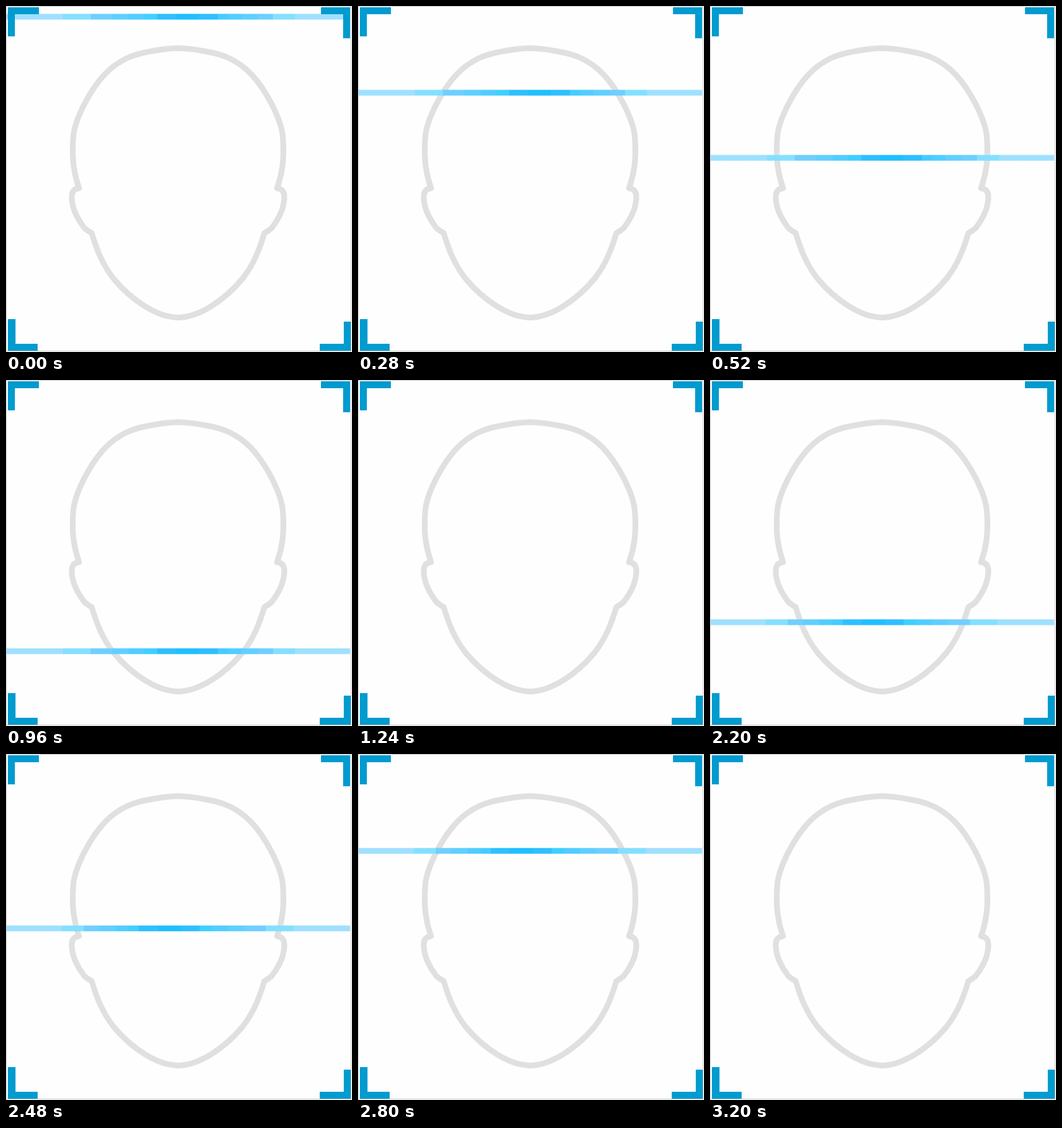
Write an HTML page that moves like this. It is 547x547 px and loops after 4200 ms.

```html
<!DOCTYPE html>
<html>
<head>
<meta charset="utf-8">
<title>Face scan</title>
<style>
  html, body { margin: 0; width: 100%; height: 100%; overflow: hidden; background: #fefefe; }
  svg { display: block; width: 100%; height: 100%; }
</style>
</head>
<body>
<svg viewBox="0 0 547 547">
  <defs><linearGradient id="glow" gradientUnits="userSpaceOnUse" x1="0" x2="545"></linearGradient></defs>
  <rect x=".5" y=".5" width="545" height="545" fill="none" stroke="#c8c8c8"/>
  <g fill="none" stroke="#e0e0e0" stroke-width="9" stroke-linejoin="round" stroke-linecap="round">
    <path id="half" d="M272 66.8C256 66.8 243 69 230 71.5C200 76 178 86 157 107
      C134 131 110 176 106.5 205C104 235 105.5 260 115.5 288C107 289 104 294 104 302
      C104 322 114 338 124 351C128 355 132 357 135.5 359C143 384 152 408 170 431
      C200 467 240 492 272 492.5"/>
    <use href="#half" transform="translate(544 0) scale(-1 1)"/>
  </g>
  <rect id="bar" x="1" width="543" height="9.1" fill="url(#glow)"/>
  <path fill="#009bcf" d="M3 2H52V13H14V48H3Z M498 2H544V51H533V13H498Z
    M3 495H15V534H50V545H3Z M534 499H545V545H496V534H534Z"/>
</svg>
<script>
  const LOOP = 4200, STEP = 40;
  const bar = document.getElementById('bar');
  const glow = document.getElementById('glow');

  // Flat bands: [right edge, colour]
  const bands = [
    [90, '#9fe0ff'], [134, '#85dfff'], [168, '#6fcfff'], [194, '#5fcfff'],
    [219, '#50cdff'], [239, '#3fcfff'], [268, '#2fbfff'], [305, '#1fbfff'],
    [335, '#2fbfff'], [351, '#45ccff'], [372, '#50cdff'], [398, '#60cfff'],
    [422, '#6fcfff'], [457, '#85dfff'], [545, '#9fe0ff']
  ];
  let left = 0;
  for (const [right, color] of bands) {
    for (const x of [left, right]) {
      const stop = document.createElementNS(glow.namespaceURI, 'stop');
      stop.setAttribute('offset', x / 545);
      stop.setAttribute('stop-color', color);
      glow.append(stop);
    }
    left = right;
  }

  function draw(now) {
    const step = Math.floor((now % LOOP) / STEP);
    const down = step < 31;
    const up = step >= 45 && step < 80;
    const y = down ? 12.4 + 17.16 * step : 531.6 - 15.32 * (step - 45);
    bar.setAttribute('visibility', down || up ? 'visible' : 'hidden');
    bar.setAttribute('y', y);
    // The glow is mirrored on the way up
    bar.setAttribute('transform', down ? '' : 'translate(545 0) scale(-1 1)');
    requestAnimationFrame(draw);
  }
  draw(0);
</script>
</body>
</html>
```
